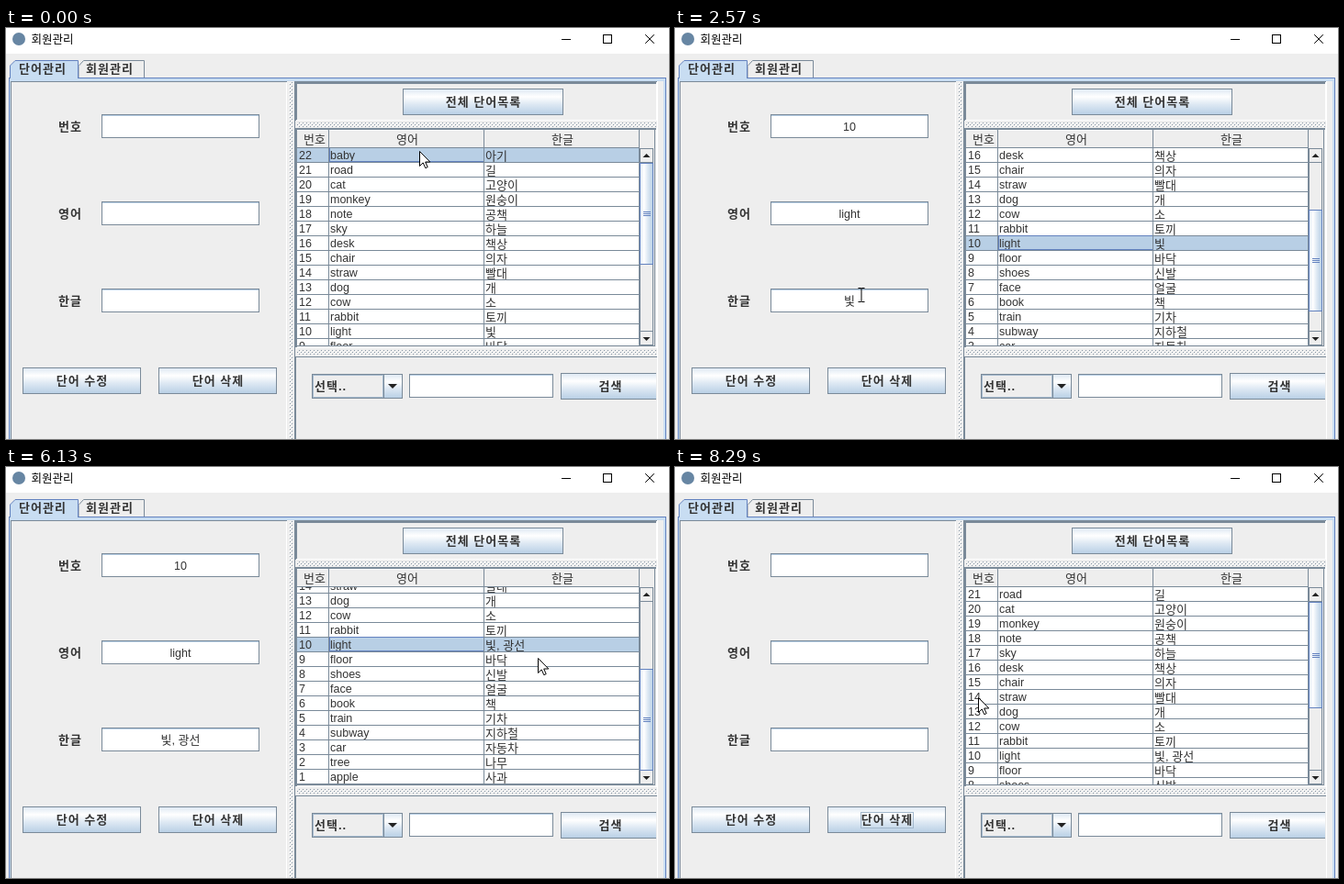
Animation of 722 by 448 pixels, one loop 8520 ms. Source, as an HTML page:

```html
<!DOCTYPE html>
<html lang="ko">
<head>
<meta charset="utf-8">
<title>회원관리</title>
<style>
html, body { margin: 0; width: 100%; height: 100%; overflow: hidden; background: #eee; }
svg { display: block; width: 722px; height: 448px; }
text { font: 13px "Liberation Sans", "Noto Sans CJK KR", "Noto Sans CJK", sans-serif; fill: #333; white-space: pre; }
.b { font-weight: bold; letter-spacing: 1px; }
.l { font-size: 12.5px; }
.w { font: 12.5px "Noto Sans CJK KR", "Noto Sans CJK", sans-serif; fill: #000; }
.dt { font: 12px "Open Sans", sans-serif; fill: #000; }
.m { text-anchor: middle; }
.key { font-size: 11.5px; letter-spacing: 0; }
.u { text-decoration: underline; }
.q { font: bold 23px "Noto Serif", serif; fill: #222; }
#win.off text { fill: #999; }
#win.off path { stroke: #999; }
rect, .crisp { shape-rendering: crispEdges; }
</style>
</head>
<body>
<svg id="stage" viewBox="0 0 722 448" xmlns="http://www.w3.org/2000/svg"></svg>
<script>
const LOOP = 8520;
const DARK = '#7a8a99', SEL = '#b8cfe5', BLUE = '#6382bf', TAB = '#c8ddf2', BG = '#eee';
const VIEW_H = 215, TRACK = 184, ROW_H = 16, FIELD_H = 26;
const WORDS = ('baby 아기,road 길,cat 고양이,monkey 원숭이,note 공책,sky 하늘,desk 책상,chair 의자,' +
  'straw 빨대,dog 개,cow 소,rabbit 토끼,light 빛,floor 바닥,shoes 신발,face 얼굴,book 책,' +
  'train 기차,subway 지하철,car 자동차,tree 나무,apple 사과').split(',').map(w => w.split(' '));
const FIELD_Y = [94, 189, 284];
const key = c => `<tspan class="key">(<tspan class="u">${c}</tspan>)</tspan>`;
const BUTTONS = {
  all: [432, 66, 175, 29, '전체 단어목록', 84],
  edit: [18, 370, 129, 29, '단어 수정', 58],
  del: [166, 370, 129, 29, '단어 삭제', 58],
  find: [604, 376, 108, 29, '검색', 28],
  yes: [267, 235, 78, 27, '예' + key('Y'), 34],
  no: [351, 235, 79, 27, '아니오' + key('N'), 60]
};

// start, end, steps, x, y
const MOVES = [
  [0, 0, 1, 450, 134], [460, 930, 7, 466, 166], [1230, 1290, 2, 468, 93], [1370, 1550, 3, 482, 78],
  [2260, 2420, 3, 470, 234], [2490, 2570, 2, 203, 291], [2650, 2720, 2, 204, 294],
  [2890, 3200, 5, 205, 309], [4030, 4420, 6, 128, 402], [4500, 4650, 3, 119, 380],
  [5040, 5190, 3, 506, 191], [5510, 5670, 3, 592, 200], [6050, 6130, 2, 579, 208],
  [6830, 6910, 2, 470, 136], [6990, 7140, 3, 241, 379], [7450, 7680, 4, 306, 248],
  [7980, 8290, 5, 330, 251]
];

const EVENTS = [
  [0, { sel: 22, form: 0, focus: 'cell', press: '', scroll: 0, caret: 0, edited: false, gone: false, dialog: 0 }],
  [140, { form: 22 }],
  [1000, { sel: 20, form: 20 }],
  [1930, { press: 'all', focus: 'all' }],
  [2010, { press: '', sel: 0, form: 0 }],
  [2260, { scroll: 48 }],
  [2340, { scroll: 96 }],
  [2420, { sel: 10, form: 10, focus: 'cell' }],
  [2970, { focus: 'field', caret: 196 }],
  [3350, { caret: 0 }],
  [3650, { edited: true, caret: 211 }],
  [4720, { caret: 0, press: 'edit', focus: 'edit' }],
  [4800, { press: 'all' }],
  [4890, { press: '', sel: 0, form: 0, saved: true }],
  [5040, { scroll: 120 }],
  [5120, { scroll: 137 }],
  [5190, { sel: 10, form: 10, focus: 'cell' }],
  [6830, { scroll: 0 }],
  [6910, { sel: 22, form: 22 }],
  [7210, { press: 'del', focus: 'del' }],
  [7280, { press: '', focus: 'yes', dialog: .62 }],
  [7370, { dialog: 1 }],
  [7740, { press: 'yes' }],
  [7820, { press: '', dialog: .45 }],
  [7900, { dialog: 0, press: 'all', focus: 'del' }],
  [7980, { press: '', gone: true, sel: 0, form: 0 }]
];

const rect = (x, y, w, h, fill, more = '') =>
  `<rect x="${x}" y="${y}" width="${w}" height="${h}" fill="${fill}" ${more}/>`;
const frame = (x, y, w, h, stroke, fill = 'none', more = '') =>
  rect(x + .5, y + .5, w - 1, h - 1, fill, `stroke="${stroke}" ${more}`);
const text = (x, y, s, cls = '', more = '') => `<text x="${x}" y="${y}" class="${cls}" ${more}>${s}</text>`;
const path = (d, stroke, fill = 'none', more = '') => `<path d="${d}" stroke="${stroke}" fill="${fill}" ${more}/>`;
const field = (x, y, w) => frame(x, y, w, FIELD_H, DARK, '#fff') + rect(x + 1, y + 1, w - 2, 1, SEL);
const cross = (x, y, r) => path(`M${x - r} ${y - r}l${2 * r} ${2 * r}m0 ${-2 * r}l${-2 * r} ${2 * r}`, '#000');
const arrow = (x, y, s) => path(`M${x - 4} ${y}h8l-4 ${4 * s}z`, 'none', '#222');

function button(id) {
  const [x, y, w, h, label, tw] = BUTTONS[id], cx = x + w / 2, cy = y + h / 2;
  const border = id === 'yes' ? frame(x + 1, y + 1, w - 2, h - 2, DARK) : '';
  return `<g id="${id}">` + frame(x, y, w, h, DARK, 'url(#btn)') + border +
    `<g class="hot">${frame(x, y, w, h, SEL)}${frame(x + 1, y + 1, w - 2, h - 2, DARK)}${frame(x + 2, y + 2, w - 4, h - 4, SEL)}</g>` +
    `<g class="down">${rect(x + 1, y + 1, w - 2, h - 2, SEL)}</g>` +
    `<g class="ring">${frame(Math.round(cx - tw / 2), Math.round(cy - 9), tw, 18, '#a3b8cc')}</g>` +
    text(cx + .5, cy + 4.5, label, 'b m') + '</g>';
}

function gradient(id, dir) {
  const stops = [[0, '#dde8f3'], [.3, '#fff'], [.6, '#dde8f3'], [1, SEL]];
  return `<linearGradient id="${id}" x1="0" y1="0" ${dir}>` +
    stops.map(([o, c]) => `<stop offset="${o}" stop-color="${c}"/>`).join('') + '</linearGradient>';
}

const defs = '<defs>' + gradient('btn', 'x2="0" y2="1"') + gradient('bar', 'x2="1" y2="0"') +
  '<pattern id="bumps" width="4" height="4" patternUnits="userSpaceOnUse">' + rect(0, 0, 4, 4, BG) +
  rect(0, 0, 1, 1, '#fff') + rect(1, 1, 1, 1, '#8796a5') + rect(2, 2, 1, 1, '#fff') + rect(3, 3, 1, 1, '#8796a5') +
  '</pattern><clipPath id="view">' + rect(317, 131, 373, VIEW_H, '#000') +
  '</clipPath><clipPath id="right">' + rect(316, 358, 392, 90, '#000') + '</clipPath></defs>';

const titleBar = rect(0, 0, 722, 28, '#fff') + '<circle cx="14" cy="12" r="7" fill="#6786a3"/>' +
  '<g id="win">' + text(27.5, 16.5, '회원관리', 'w') + path('M605 12.5h10M650.5 7.5h9v9h-9z', '#000', 'none', 'class="crisp"') +
  cross(701, 12, 4.8) + '</g>';

const tabs = path('M79 54V41.5L84.5 35.5H150.5V54', DARK, BG) +
  rect(3, 54, 716, 394, BLUE) + rect(4, 55, 714, 393, TAB) + rect(6, 58, 710, 390, BG) +
  path('M4.5 55V41L10 35.5H78.5V55', BLUE, TAB) + rect(5, 54, 73, 2, TAB) +
  text(14, 49, '단어관리', 'b') + text(87, 49, '회원관리', 'b');

const panes = rect(5, 58, 301, 1, DARK) + rect(5, 58, 1, 390, DARK) + rect(305, 59, 1, 389, '#fff') +
  rect(308, 59, 5, 389, 'url(#bumps)') +
  rect(314, 58, 395, 1, DARK) + rect(314, 58, 1, 390, DARK) +
  rect(315, 59, 394, 2, DARK) + rect(315, 59, 2, 42, DARK) + rect(708, 59, 1, 42, '#fff') + rect(316, 100, 393, 1, '#fff') +
  rect(317, 103, 391, 5, 'url(#bumps)') +
  rect(315, 109, 394, 2, DARK) + rect(315, 109, 2, 239, DARK) + rect(316, 346, 391, 1, DARK) +
  rect(706, 110, 1, 237, DARK) + rect(708, 109, 1, 240, '#fff') + rect(316, 348, 393, 1, '#fff') +
  rect(317, 351, 391, 5, 'url(#bumps)') +
  rect(315, 358, 394, 1, DARK) + rect(315, 358, 1, 90, DARK) + rect(709, 58, 1, 390, '#fff');

const form = ['번호', '영어', '한글'].map((s, i) =>
  text(57, FIELD_Y[i] + 18, s, 'b') + field(104, FIELD_Y[i], 172) +
  text(190, FIELD_Y[i] + 18, '', i < 2 ? 'l m' : 'm', `id="in${i}"`)).join('') +
  rect(0, 289, 1, 16, '#000', 'id="caret"');

const rows = WORDS.map(([en, ko], i) => {
  const y = 131 + i * ROW_H, n = WORDS.length - i;
  return rect(317, y, 373, ROW_H, '#fff', `id="row${n}"`) + rect(317, y + 15, 373, 1, DARK) +
    text(319, y + 12, n, 'l') + text(353, y + 12, en, 'l') + text(522, y + 12.5, ko, '', `id="ko${n}"`);
}).join('');

const table = rect(317, 111, 373, 20, BG) + rect(317, 130, 373, 1, DARK) +
  rect(317, 111, 373, 1, '#fff') +
  text(336, 125.5, '번호', 'm') + text(437, 125.5, '영어', 'm') + text(606, 125.5, '한글', 'm') +
  `<g clip-path="url(#view)"><g id="rows">${rows}${frame(352, 0, 169, ROW_H, BLUE, 'none', 'id="cell"')}</g></g>` +
  [351, 520, 689].map(x => rect(x, 111, 1, 235, DARK)).join('');

const scrollBar = frame(690, 131, 15, VIEW_H, DARK, BG) + frame(690, 131, 15, 16, DARK, BG) + frame(690, 330, 15, 16, DARK, BG) +
  arrow(697.5, 141, -1) + arrow(697.5, 337, 1) +
  frame(690, 147, 15, 111, BLUE, 'url(#bar)', 'id="thumb"') +
  '<g id="grip">' + [-2, 0, 2].map(y => rect(694, y, 8, 1, BLUE)).join('') + '</g>';

const search = frame(333, 377, 99, 27, DARK, 'url(#btn)') + frame(334, 378, 77, 25, '#a3b8cc', BG) +
  rect(411, 378, 1, 25, DARK) + path('M416 388h10l-5 5z', 'none', '#222') +
  text(336, 395, '선택..', 'b') + field(439, 377, 157) + `<g clip-path="url(#right)">${button('find')}</g>`;

const dialog = '<g id="dialog">' + [6, 4, 2].map(d =>
    `<rect x="${156 - d}" y="${158 - d / 2}" width="${385 + 2 * d}" height="${119 + d * 1.5}" rx="${d}" fill="#000" opacity=".06"/>`).join('') +
  frame(155, 157, 386, 120, '#8a8a8a', BG) + rect(156, 158, 384, 25, '#fff') +
  text(160.5, 174.5, 'Confirm', 'dt') + cross(524.5, 171, 5) +
  rect(169, 195, 29, 29, '#7f9a7f') + rect(167, 193, 28, 28, '#a5cfa5', 'stroke="#4f7a4f"') +
  text(181.5, 216, '?', 'q m') +
  text(213.5, 216.5, '삭제한 단어는 되돌릴 수 없습니다. 계속하시겠습니까?', 'b') +
  button('yes') + button('no') + '</g>';

const pointer = '<g id="pointer">' +
  path('M.5 .5V16.5L4.2 12.9 6.8 18.7 9.2 17.6 6.7 12H11.8z', '#000', '#fff') + '</g>' +
  '<g id="beam">' + path('M-3.5 -7.5h3l.5 .5 .5 -.5h3M0 -7V7M-3.5 7.5h3l.5 -.5 .5 .5h3', '#000') + '</g>';

document.getElementById('stage').innerHTML = defs + rect(0, 0, 722, 448, BG) + titleBar + tabs + panes + form +
  button('edit') + button('del') + button('all') + table + scrollBar + search + dialog + pointer;

const $ = id => document.getElementById(id);
const set = (el, o) => { for (const k in o) el.setAttribute(k, o[k]); };
const show = (el, on) => { el.style.display = on ? '' : 'none'; };

function cursorAt(t) {
  let [, , , x, y] = MOVES[0];
  for (const [t0, t1, n, tx, ty] of MOVES) {
    if (t < t0) break;
    const step = t >= t1 ? n : Math.floor((t - t0) / (t1 - t0) * (n - 1) + 1e-6) + 1;
    const p = step / n, e = p * p * (3 - 2 * p);
    x += (tx - x) * e;
    y += (ty - y) * e;
  }
  return [Math.round(x), Math.round(y)];
}

function draw(t) {
  const s = Object.assign({}, ...EVENTS.filter(e => e[0] <= t).map(e => e[1]));
  const [x, y] = cursorAt(t);
  const inBox = (bx, by, w, h) => x >= bx && x < bx + w && y >= by && y < by + h;

  const beam = !s.dialog && FIELD_Y.some(fy => inBox(104, fy, 172, FIELD_H));
  show($('pointer'), !beam);
  show($('beam'), beam);
  set($(beam ? 'beam' : 'pointer'), { transform: `translate(${x} ${y})` });

  for (const id in BUTTONS) {
    const [bx, by, w, h] = BUTTONS[id], g = $(id);
    show(g.querySelector('.hot'), ['all', 'edit', 'del'].includes(id) && inBox(bx, by, w, h - 2));
    show(g.querySelector('.down'), s.press === id);
    show(g.querySelector('.ring'), s.focus === id);
  }

  const word = WORDS[WORDS.length - s.form], light = '빛, 광선';
  const korean = s.form === 10 && s.edited ? light : word && word[1];
  [s.form, word && word[0], korean].forEach((v, i) => { $('in' + i).textContent = v || ''; });
  $('ko10').textContent = s.saved ? light : '빛';
  show($('caret'), s.caret);
  set($('caret'), { x: s.caret });

  for (let n = 1; n <= WORDS.length; n++) set($('row' + n), { fill: n === s.sel ? SEL : '#fff' });
  show($('cell'), s.sel && s.focus === 'cell');
  set($('cell'), { y: 130.5 + (WORDS.length - s.sel) * ROW_H });
  set($('rows'), { transform: `translate(0 ${-s.scroll - (s.gone ? ROW_H : 0)})` });

  const total = (WORDS.length - (s.gone ? 1 : 0)) * ROW_H;
  const len = Math.floor(TRACK * VIEW_H / total) - 1;
  const top = 147 + Math.round(s.scroll / (total - VIEW_H) * (TRACK - len));
  set($('thumb'), { y: top + .5, height: len - 1 });
  set($('grip'), { transform: `translate(0 ${top + Math.floor(len / 2)})` });

  const k = s.dialog < 1 ? .965 : 1;
  show($('dialog'), s.dialog);
  set($('dialog'), { opacity: s.dialog, transform: `translate(348.5 217) scale(${k}) translate(-348.5 -217)` });
  $('win').setAttribute('class', s.dialog ? 'off' : '');
}

function tick() {
  draw(performance.now() % LOOP);
  requestAnimationFrame(tick);
}
tick();
</script>
</body>
</html>
```
